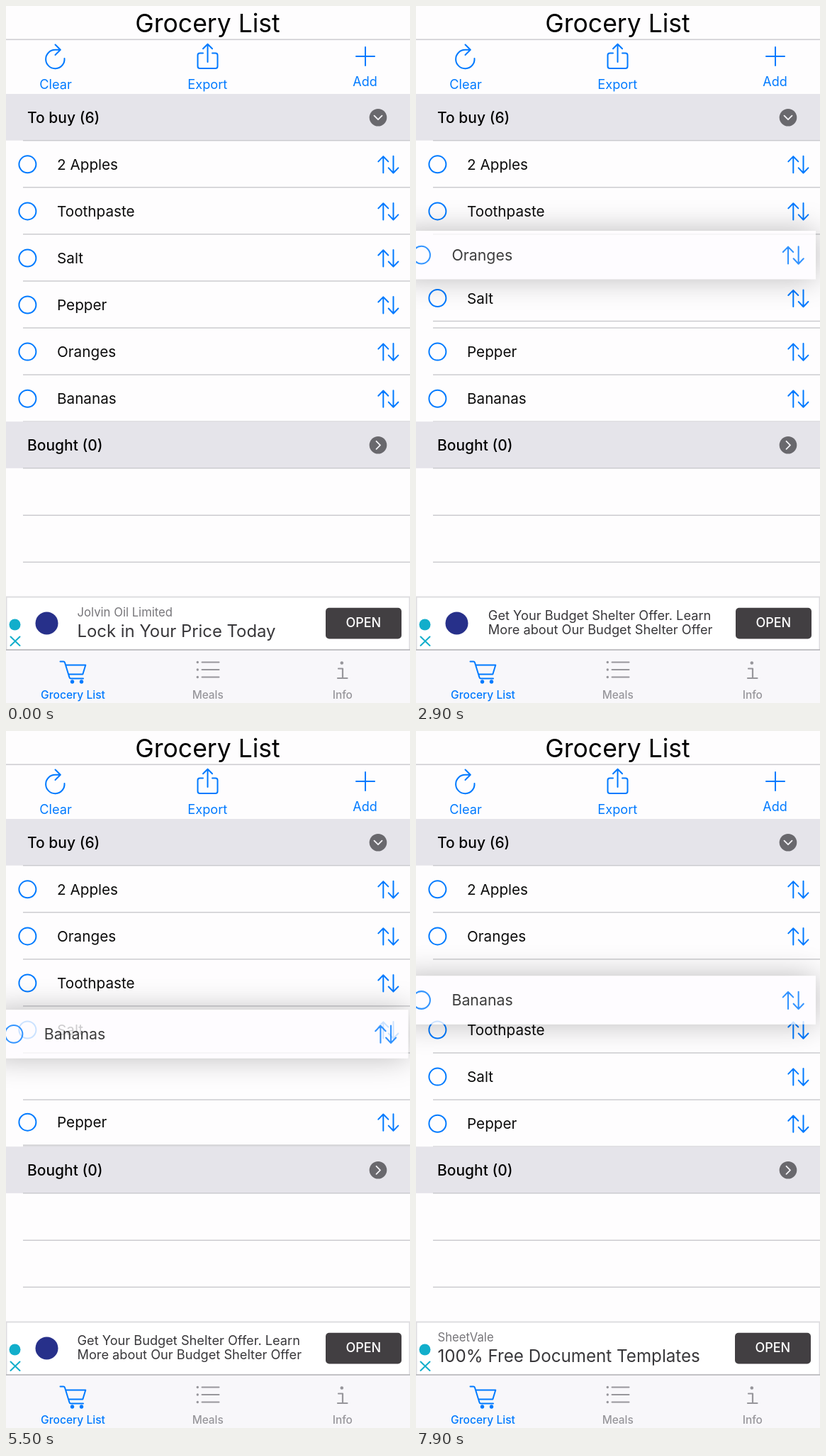
These frames come from a looping animation (570x983 px, 8 s). An HTML page with a canvas:

```html
<!DOCTYPE html>
<html lang="en">
<head>
<meta charset="utf-8">
<title>Grocery List</title>
<style>
html, body { margin: 0; width: 100%; height: 100%; overflow: hidden; background: #fefdfe; }
canvas { display: block; width: 570px; height: 983px; }
</style>
</head>
<body>
<canvas id="stage" width="570" height="983"></canvas>
<script>
const ctx = document.getElementById('stage').getContext('2d');
const LOOP = 8000;
const TOP = 189.7, ROW = 66.07;
const BLUE = '#007aff', GREY = '#97969b', RULE = '#c9c9cd', INK = '#0c0c0c';
const FONT = 'Inter, Roboto, sans-serif';
const ITEMS = ['2 Apples', 'Toothpaste', 'Salt', 'Pepper', 'Oranges', 'Bananas'];

// y and x hold [time, value] keys; swaps hold [time, slot of the gap].
const DRAGS = [
  { start: 2000, from: 4, to: 1, drop: 3850, end: 4150,
    y: [[2000, 487.6], [2250, 477], [2500, 445], [2950, 340], [3250, 279], [3500, 265.5], [3850, 270], [4150, 289.4]],
    x: [[2000, -16], [2500, -20], [3500, -29], [3850, -29]],
    swaps: [[2420, 3], [2700, 2], [2960, 1]] },
  { start: 4900, from: 5, to: 2, drop: 9000, end: 9300,
    y: [[4900, 553.7], [5200, 527], [5600, 395], [6000, 294.5], [6250, 276], [6550, 285], [7100, 340], [7500, 368], [7900, 379.5], [8000, 380]],
    x: [[4900, -16], [6000, -24.7], [7100, -24.7], [7900, -23.8]],
    swaps: [[5260, 4], [5490, 3], [5747, 2], [5935, 1], [7320, 2]] }
];

const AD_INK = '#38373a', AD_SOFT = '#77767a';
const ADS = [
  { until: 6600, left: 101, clip: 88, slide: 2350, button: 451, logo: true, pages: [
    [['Jolvin Oil Limited', 16.7, 861, AD_SOFT], ['Lock in Your Price Today', 23.9, 890, AD_INK]],
    [['Get Your Budget Shelter Offer. Learn', 18.2, 866, AD_INK], ['More about Our Budget Shelter Offer', 18.2, 886, AD_INK]]] },
  { until: LOOP, left: 31, clip: 26, slide: 7200, button: 450, logo: false, pages: [
    [['Create Legal Forms In Minutes. Save To', 19, 866, AD_INK], ['PDF & Word. Templates For Any Device!', 19, 887, AD_INK]],
    [['SheetVale', 16.7, 861, AD_SOFT], ['100% Free Document Templates', 24.2, 890, AD_INK]]] }
];

const clamp = v => Math.max(0, Math.min(1, v));
function ease(v) {
  const p = clamp(v);
  return p < 0.5 ? 4 * p ** 3 : 1 - (2 - 2 * p) ** 3 / 2;
}

// Smooth curve through [time, value] keys.
function follow(keys, t) {
  const n = keys.length - 1;
  if (t <= keys[0][0]) return keys[0][1];
  if (t >= keys[n][0]) return keys[n][1];
  let i = 0;
  while (t > keys[i + 1][0]) i++;
  const slope = k => k <= 0 || k >= n ? 0 :
    (keys[k + 1][1] - keys[k - 1][1]) / (keys[k + 1][0] - keys[k - 1][0]);
  const [ta, a] = keys[i], [tb, b] = keys[i + 1];
  const d = tb - ta, u = (t - ta) / d, u2 = u * u, u3 = u2 * u;
  return (2 * u3 - 3 * u2 + 1) * a + (u3 - 2 * u2 + u) * d * slope(i) +
    (3 * u2 - 2 * u3) * b + (u3 - u2) * d * slope(i + 1);
}

function text(str, x, y, size, color, align = 'left', weight = 400) {
  ctx.font = `${weight} ${size}px ${FONT}`;
  ctx.textAlign = align;
  ctx.fillStyle = color;
  ctx.fillText(str, x, y);
}
function box(x, y, w, h, color) {
  ctx.fillStyle = color;
  ctx.fillRect(x, y, w, h);
}
function disc(x, y, r, color) {
  ctx.fillStyle = color;
  ctx.beginPath();
  ctx.arc(x, y, r, 0, 7);
  ctx.fill();
}
function stroke(d, color, width = 2) {
  ctx.strokeStyle = color;
  ctx.lineWidth = width;
  ctx.stroke(new Path2D(d));
}
const rule = y => box(24, y - 0.7, 546, 1.4, RULE);

function drawTools() {
  text('Grocery List', 284.5, 37, 35.5, '#000', 'center');
  box(0, 46.5, 570, 1.6, '#cfced2');
  stroke('M82.5 74 A13.2 13.2 0 1 1 69.5 61.8 L76 61.8 M69.5 54.5 L76.8 61.8 L69.5 69', BLUE);
  stroke('M278 66.5 H273.5 Q270.5 66.5 270.5 69.5 V85 Q270.5 88 273.5 88 H295.5 Q298.5 88 298.5 85 V69.5 Q298.5 66.5 295.5 66.5 H291 ' +
    'M284.5 79 V54 M278 60.3 L284.5 53.8 L291 60.3', BLUE);
  stroke('M494 71 H520 M507 58 V84', BLUE);
  text('Clear', 70, 117, 18.2, BLUE, 'center');
  text('Export', 284.3, 117, 18.2, BLUE, 'center');
  text('Add', 506.5, 112.5, 18, BLUE, 'center');
}

function drawHeader(label, y, chevron) {
  box(0, y, 570, TOP - 124, '#e5e4ea');
  rule(y + 65.7);
  text(label, 30, y + 41, 21, '#050505', 'left', 500);
  disc(525, y + 33.2, 12.3, '#69686d');
  ctx.save();
  ctx.translate(525, y + 33.2);
  stroke(chevron, '#f4f3f7', 1.8);
  ctx.restore();
}

// Content of a row whose centre is at y = 0.
function drawRow(label) {
  ctx.strokeStyle = BLUE;
  ctx.lineWidth = 2;
  ctx.beginPath();
  ctx.arc(30.4, 0, 12, 0, 7);
  ctx.stroke();
  text(label, 72, 7.7, 20.7, INK);
  stroke('M532.3 12 V-11 M525.3 -4 L532.3 -11.2 L539.3 -4 M546.5 -11.5 V12 M539.7 5 L546.5 12.2 L553.4 5', BLUE);
}

function drawLifted(label, drag, t) {
  const lift = ease((t - drag.start) / 200) * (1 - ease((t - drag.drop) / (drag.end - drag.drop)));
  const scale = 1 + 0.031 * lift;
  const x = follow(drag.x, t) * lift, y = follow(drag.y, t);
  const w = 570 * scale, h = ROW * scale, top = y - h / 2;

  ctx.save();
  ctx.beginPath();
  ctx.rect(0, 0, 570, 983);
  ctx.rect(x, top, w, h);
  ctx.clip('evenodd');
  ctx.shadowColor = `rgba(0,0,0,${0.27 * lift})`;
  ctx.shadowBlur = 42;
  box(x, top, w, h, '#fff');
  ctx.restore();

  ctx.save();
  ctx.globalAlpha = 1 - 0.2 * lift;
  box(x, top, w, h, '#fefdff');
  ctx.translate(x, y);
  ctx.scale(scale, scale);
  drawRow(label);
  ctx.restore();
}

function drawList(t) {
  const order = ITEMS.slice();
  let held = null, drag = null;
  for (const d of DRAGS) {
    if (t < d.start) break;
    const item = order.splice(d.from, 1)[0];
    if (t < d.end) {
      held = item;
      drag = d;
      break;
    }
    order.splice(d.to, 0, item);
  }
  order.forEach((label, i) => {
    const slot = gap => i + (drag && i >= gap ? 1 : 0);
    let pos = i;
    if (drag) {
      pos = slot(drag.from);
      for (const [at, gap] of drag.swaps) pos += (slot(gap) - pos) * ease((t - at) / 300);
    }
    const y = TOP + ROW * pos;
    rule(y + ROW);
    ctx.save();
    ctx.translate(0, y + ROW / 2 + 0.6);
    drawRow(label);
    ctx.restore();
  });
  if (drag) {
    let gap = drag.from;
    for (const [at, next] of drag.swaps) {
      if (t >= at && t < at + 300) rule(TOP + ROW * (gap + 1));
      if (t >= at) gap = next;
    }
    if (t < drag.swaps[0][0]) rule(TOP + ROW * (drag.from + 1));
  }
  drawHeader('Bought (0)', TOP + ROW * 6, 'M-2.5 -5.5 L3 0 L-2.5 5.5');
  rule(TOP + ROW * 8);
  rule(TOP + ROW * 9);
  if (drag) drawLifted(held, drag, t);
}

function drawAd(t) {
  const ad = ADS.find(a => t < a.until);
  box(0, 832.5, 570, 75.5, '#dedde0');
  box(1.5, 834.5, 567, 73, '#fff');
  disc(12.5, 872.5, 8, '#12aecb');
  stroke('M6.5 889.5 L19.5 902 M19.5 889.5 L6.5 902', '#12aecb');
  if (ad.logo) disc(57.5, 870.5, 16, '#27308a');

  const span = 440 - ad.clip, step = span + 24;
  const shift = step * ease((t - ad.slide) / 610);
  ctx.save();
  ctx.beginPath();
  ctx.rect(ad.clip, 836, span, 70);
  ctx.clip();
  ad.pages.forEach((lines, i) => {
    for (const [str, size, y, color] of lines) text(str, ad.left - 0.5 + i * step - shift, y, size, color);
  });
  ctx.restore();

  ctx.fillStyle = '#423f42';
  ctx.beginPath();
  ctx.roundRect(ad.button, 848.7, 107, 43.8, 5);
  ctx.fill();
  text('OPEN', ad.button + 53.3, 876, 18, '#fff', 'center', 500);
}

function drawTabs() {
  box(0, 908, 570, 75, '#f8f7fa');
  box(0, 907.3, 570, 1.5, '#b4b3b7');
  stroke('M76.5 924.5 H81 Q82.5 924.5 83 926 L89.5 947 Q90 948.5 91.5 948.5 H109 M84 929.5 H112.3 L108.3 942.5 H88', BLUE);
  disc(93.5, 953, 2.7, BLUE);
  disc(106.5, 953, 2.7, BLUE);
  for (const y of [925.5, 936, 946.5]) {
    disc(270.3, y, 1.7, GREY);
    stroke(`M276.5 ${y} H300.5`, GREY);
  }
  disc(473.8, 926.5, 2.3, GREY);
  stroke('M469 934.5 H475 V948 M468 948 H481.5', GREY, 2.2);
  text('Grocery List', 94.5, 977, 15.6, BLUE, 'center', 500);
  text('Meals', 284.7, 977, 15.4, GREY, 'center', 500);
  text('Info', 474.8, 977, 15.4, GREY, 'center', 500);
}

function draw(t) {
  box(0, 0, 570, 983, '#fefdfe');
  ctx.lineCap = 'round';
  ctx.lineJoin = 'round';
  drawTools();
  drawHeader('To buy (6)', 124, 'M-5.5 -2.5 L0 3 L5.5 -2.5');
  drawList(t);
  drawAd(t);
  drawTabs();
}

const began = performance.now();
function tick() {
  draw((performance.now() - began) % LOOP);
  requestAnimationFrame(tick);
}
tick();
</script>
</body>
</html>
```
